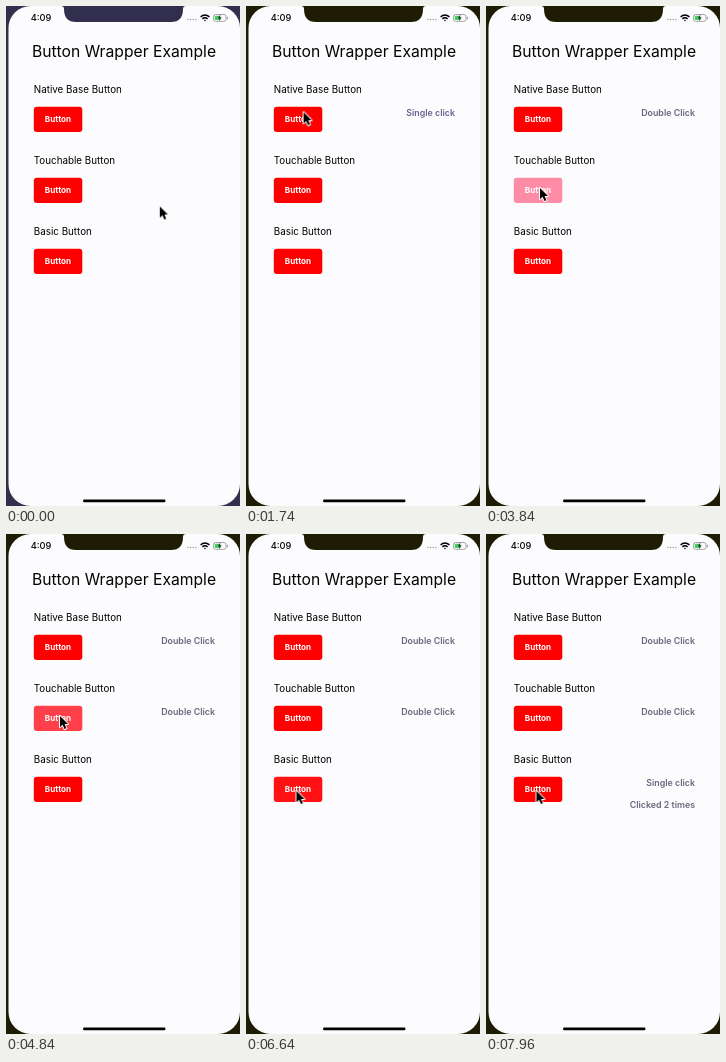
Recreate the animation shown at these times as an HTML page. Size 234 px wide and 500 px high, loop 8000 ms.

```html
<!DOCTYPE html>
<html lang="en">
<head>
<meta charset="utf-8">
<title>Button Wrapper Example</title>
<style>
  html, body { margin: 0; width: 100%; height: 100%; overflow: hidden; }
  svg { display: block; width: 234px; height: 500px; font-family: Inter, Roboto, sans-serif; }
  .backdrop { fill: #322f4e; }
  .title { font-size: 15.7px; text-anchor: middle; }
  .label { font-size: 9.82px; }
  .caption { font-size: 8.15px; font-weight: 700; fill: #fff; text-anchor: middle; }
  .result { font-size: 8.85px; font-weight: 600; fill: #67677c; text-anchor: end; opacity: 0; }
  .clock { font-size: 9.2px; font-weight: 500; }
</style>
</head>
<body>
<svg viewBox="0 0 234 500">
  <rect class="backdrop" width="234" height="500"/>
  <rect x="2.5" width="231.5" height="500" rx="22" fill="#fcfcfe"/>
  <path class="backdrop" d="M55 0Q58 0 58 3Q58 16 70 16H165Q177 16 177 3Q177 0 180 0Z"/>

  <text class="clock" x="24.7" y="15">4:09</text>
  <g fill="#a0a0a8">
    <circle cx="182" cy="13.5" r=".8"/><circle cx="184.6" cy="13.5" r=".8"/>
    <circle cx="187.2" cy="13.5" r=".8"/><circle cx="189.8" cy="13.5" r=".8"/>
  </g>
  <g fill="none" stroke="#000" stroke-width="1.5">
    <path d="M194.6 10.9Q199 7 203.4 10.9M196.4 12.9Q199 10.6 201.6 12.9"/>
    <path d="M199 15.3L197.9 14.1Q199 13.2 200.1 14.1Z" fill="#000" stroke="none"/>
  </g>
  <rect x="207.5" y="8.5" width="12.5" height="6.8" rx="2" fill="none" stroke="#9a9aa2" stroke-width=".9"/>
  <rect x="208.7" y="9.7" width="5.6" height="4.4" rx="1" fill="#3fce62"/>
  <path d="M214.6 8.6L211.8 12.2H213.7L212.9 15.2L215.8 11.4H213.9Z" fill="#222"/>
  <rect x="220.9" y="10.7" width="1.1" height="2.5" rx=".5" fill="#9a9aa2"/>

  <text class="title" x="118" y="51">Button Wrapper Example</text>
  <g id="rows"></g>
  <rect x="77" y="493.5" width="82.5" height="2.8" rx="1.4"/>
  <path id="cursor" d="M0 0V11.2L2.6 8.8L4.5 13.1L6.4 12.3L4.6 8.1H8Z"
        stroke="#fff" stroke-width="1.8" stroke-linejoin="round" paint-order="stroke"/>
</svg>
<script>
const LOOP = 8000;
const IDLE = '#f00', PRESSED = '#ff8ca6';
const rows = document.getElementById('rows');

function add(tag, attrs, text = '') {
  const el = document.createElementNS('http://www.w3.org/2000/svg', tag);
  for (const name in attrs) el.setAttribute(name, attrs[name]);
  el.textContent = text;
  return rows.appendChild(el);
}

// steps: [time in ms, value, easing towards the next step]
function track(el, prop, steps, easing = 'linear') {
  const all = [...steps, [LOOP, steps.at(-1)[1]]];
  el.animate(
    all.map(([time, value, ease]) => ({ offset: time / LOOP, [prop]: value, easing: ease || easing })),
    { duration: LOOP, iterations: Infinity });
}

function addResult(text, y, from, to = LOOP) {
  const el = add('text', { class: 'result', x: 209, y }, text);
  const steps = [[0, 0], [from, 1]];
  if (to < LOOP) steps.push([to, 0]);
  track(el, 'opacity', steps, 'step-end');
  return el;
}

// presses: [down, up]; the button pales when pressed and recovers on release
function addButton(label, top, presses) {
  add('text', { class: 'label', x: 27.8, y: top - 13.7 }, label);
  const box = add('rect', { x: 27.8, y: top - .3, width: 48.5, height: 25.4, rx: 3 });
  add('text', { class: 'caption', x: 52, y: top + 15.3 }, 'Button');
  const steps = [[0, IDLE]];
  presses.forEach(([down, up], i) => {
    const next = presses[i + 1]?.[0] ?? LOOP;
    steps.push([down, IDLE], [Math.min(down + 90, up), PRESSED], [up, PRESSED]);
    steps.push([Math.min(up + 240, next - 1), IDLE]);
  });
  track(box, 'fill', steps);
}

addButton('Native Base Button', 101, [[1150, 1260], [1800, 1890], [1990, 2080]]);
addButton('Touchable Button', 172, [[3720, 3860], [4400, 4490], [4610, 4710]]);
addButton('Basic Button', 243, [[6630, 6740], [7480, 7590]]);

const first = addResult('Single click', 109.5, 1560, 2080);
first.style.fill = '#67628f';
addResult('Double Click', 109.5, 2080);
addResult('Single click', 180.5, 4060, 4710);
addResult('Double Click', 180.5, 4710);
addResult('Single click', 251.5, 6760);
addResult('Clicked 1 times', 273.5, 6760, 7600);
addResult('Clicked 2 times', 273.5, 7600);

for (const el of document.querySelectorAll('.backdrop'))
  track(el, 'fill', [[0, '#322f4e'], [1200, '#1e1c05']], 'step-end');

const at = (x, y) => `translate(${x}px, ${y}px)`;
track(document.getElementById('cursor'), 'transform', [
  [0, at(153.8, 200.5)],
  [20, at(153.8, 200.5), 'ease-in-out'],
  [980, at(57.6, 106.2)],
  [2480, at(57.6, 106.2), 'ease-in-out'],
  [2960, at(57.6, 178.2), 'ease-out'],
  [3120, at(58, 190), 'ease-in-out'],
  [3400, at(54, 182)],
  [5060, at(54, 182), 'ease-in-out'],
  [5740, at(52, 264), 'ease-in-out'],
  [6100, at(50.5, 257)],
]);
</script>
</body>
</html>
```
